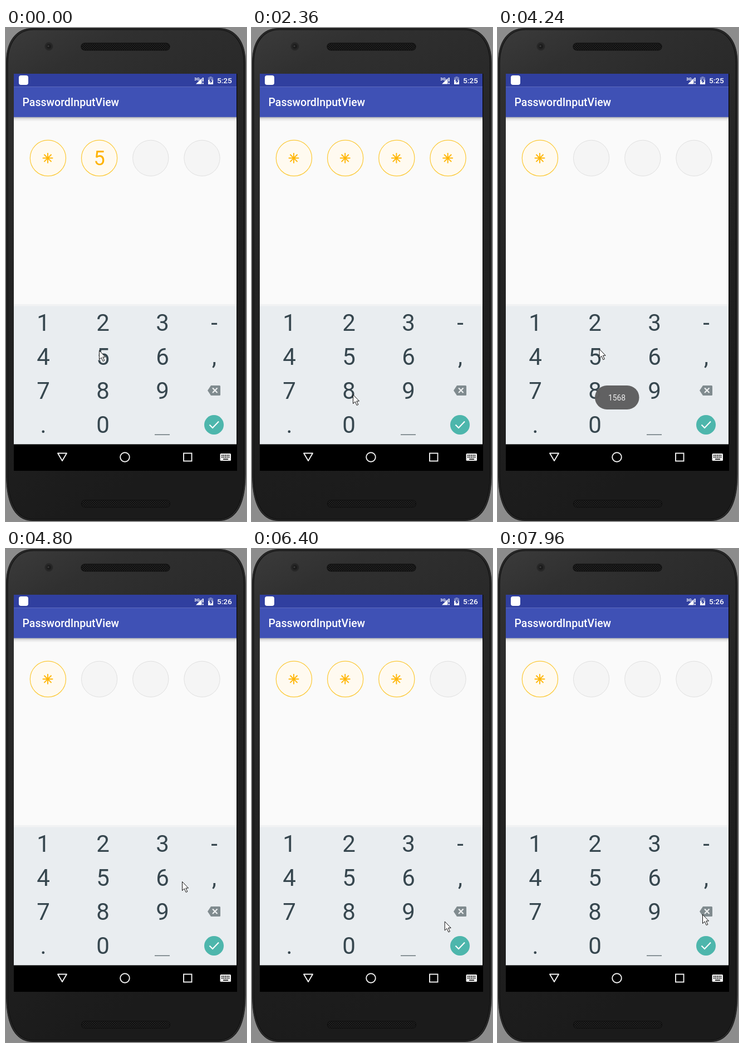
An HTML page that plays this animation: 431x884 px, repeating every 8 s.

```html
<!DOCTYPE html>
<html lang="en">
<head>
<meta charset="utf-8">
<title>PasswordInputView</title>
<style>
html, body { margin: 0; width: 100%; height: 100%; overflow: hidden; background: #8c8c8c; }
svg { display: block; width: 431px; height: 884px; font-family: Roboto, sans-serif; }
.keys { font-size: 42px; fill: #37474f; text-anchor: middle; }
.medium { font-weight: 500; fill: #fff; }
.slot circle { fill: #f5f5f5; stroke: #e0e0e0; }
.slot text { font-size: 36px; fill: #ffb300; text-anchor: middle; }
.slot path { stroke: #ffb70a; stroke-width: 1.9; }
.slot.on circle { fill: #fffaf0; stroke: #fcc936; stroke-width: 1.2; }
</style>
</head>
<body>
<svg viewBox="0 0 431 884">
  <defs>
    <linearGradient id="metal" x1="0" y1="0" x2=".25" y2="1">
      <stop offset="0" stop-color="#3b3b3b"/>
      <stop offset=".12" stop-color="#303030"/>
      <stop offset=".5" stop-color="#232323"/>
      <stop offset="1" stop-color="#1b1b1b"/>
    </linearGradient>
    <linearGradient id="shade" x1="0" y1="0" x2="0" y2="1">
      <stop offset="0" stop-color="#000" stop-opacity=".28"/>
      <stop offset=".4" stop-color="#000" stop-opacity=".09"/>
      <stop offset="1" stop-color="#000" stop-opacity="0"/>
    </linearGradient>
    <pattern id="mesh" width="4" height="4" patternUnits="userSpaceOnUse">
      <rect width="4" height="4" fill="#222"/>
      <circle cx="1" cy="1" r="1" fill="#060606"/>
      <circle cx="3" cy="3" r="1" fill="#060606"/>
    </pattern>
    <path id="shell" d="M.5 62C.5 24 18 .5 48 .5H382C412 .5 430 24 430 62V800C430 845 418 883.500 382 883.500H48C12 883.500 .5 845 .5 800Z"/>
  </defs>

  <g id="phone">
    <rect width="431" height="884" fill="#8c8c8c"/>
    <use href="#shell" fill="#292929" stroke="#171717"/>
    <use href="#shell" fill="url(#metal)" stroke="#111" stroke-width="1.2" transform="translate(2.500 2.500) scale(.988 .9943)"/>
    <g fill="url(#mesh)" stroke="#0f0f0f" stroke-width="1.2">
      <rect x="135" y="27" width="159" height="13" rx="6.500"/>
      <rect x="135.500" y="846.500" width="159" height="13" rx="6.500"/>
    </g>
    <circle cx="77" cy="33" r="7.500" fill="#262626" stroke="#303030"/>
    <circle cx="77" cy="33" r="4" fill="#1b1b1b"/>
    <circle cx="76" cy="32.500" r="1.600" fill="#3c3c3c"/>
  </g>

  <g id="screen">
    <rect x="14" y="82" width="401" height="712"/>
    <rect x="14" y="105" width="400" height="392" fill="#fafafa"/>
    <rect x="14" y="82" width="400" height="23.400" fill="#303f9f"/>
    <rect x="14" y="105.300" width="400" height="54.500" fill="#3f51b5"/>
    <rect x="14" y="159.800" width="400" height="8" fill="url(#shade)"/>
    <text class="medium" x="29.500" y="140" font-size="19.5">PasswordInputView</text>

    <g class="medium">
      <rect x="23" y="85" width="17" height="17" rx="4"/>
      <text x="338" y="93.500" font-size="8" font-weight="700">3G</text>
      <path d="M341 100.500L351.500 90V100.500Z"/>
      <path d="M352.700 89h2v7h-2zm0 9h2v2.500h-2z"/>
      <path d="M365.500 87h4v1.500h2.500V101h-9V88.500h2.500Z" opacity=".35"/>
      <path d="M363 93h9v8h-9Z"/>
      <path d="M368.500 90l-4 5.500h2.700v4l4-5.500h-2.700Z" fill="#303f9f"/>
      <text id="clock" x="379" y="99" font-size="13.6"></text>
    </g>
  </g>

  <g id="slots"></g>

  <g id="keyboard">
    <rect x="14" y="495" width="400" height="4" fill="#f1f2f3"/>
    <rect x="14" y="499" width="400" height="247.400" fill="#e9edf0"/>
    <rect id="press" x="337" y="627" width="73" height="46" rx="2" fill="#cdd5d9"/>
    <g id="keys" class="keys"></g>
    <rect x="267" y="728.500" width="27" height="1.500" fill="#6b777c"/>
    <path d="M362 650l6-9h15.500q1.500 0 1.500 1.500v15q0 1.500-1.500 1.500H368Z" fill="#808b8f"/>
    <path d="M371 645.500l8.500 8.500m0-8.500l-8.500 8.500" stroke="#eef1f2" stroke-width="2.200"/>
    <circle cx="373.500" cy="711.500" r="17.500" fill="#4db6ac"/>
    <path d="M365.500 711.500l5.500 5.500 11-11.500" fill="none" stroke="#fff" stroke-width="2.100"/>
  </g>

  <g id="nav" fill="none" stroke="#f2f2f2" stroke-width="1.900">
    <path d="M93 762.500h16l-8 13.500Z" stroke-linejoin="round"/>
    <circle cx="213.500" cy="769.500" r="8.300"/>
    <rect x="319" y="762.500" width="14.500" height="14"/>
    <rect x="384.500" y="763" width="19.500" height="13" rx="1.500" fill="#f2f2f2" stroke="none"/>
    <path d="M387 766.300h15M387 769.500h15" stroke="#000" stroke-dasharray="1.800 1.300"/>
    <path d="M390 773.200h9" stroke="#000" stroke-width="1.600"/>
  </g>

  <g id="toast">
    <rect x="174" y="641" width="79.500" height="43" rx="21.500" fill="#5d5d5d" fill-opacity=".97"/>
    <text x="213.500" y="668" font-size="13.800" fill="#efefef" text-anchor="middle">1568</text>
  </g>

  <path id="cursor" d="M.5 .5V16.500L4.200 13l3 6.500 2.600-1.200-3-6.300H11.500Z" fill="#fff" stroke="#111"/>
</svg>
<script>
const LOOP = 8000;
const MASK = 220;      // a digit turns into a star
const CLEAR = 380;     // a full code is wiped
const PRESS = 110;     // the delete key lights up before it acts
const MINUTE = 4480;
const DEL = "<";

const TAPS = [[-160, "5"], [830, "6"], [2120, "8"], [3940, "5"], [5050, "6"], [5860, "9"],
  [7100, DEL], [7880, DEL]];

// pointer trips: start, duration, x, y
const START = [167, 578];
const TRIPS = [[60, 210, 289, 590], [1000, 190, 270, 613], [1190, 590, 181, 657],
  [3150, 340, 167, 573], [4190, 520, 316, 596], [5050, 470, 281, 645],
  [6030, 240, 336, 672], [6270, 460, 370, 656], [7840, 120, 367, 655]];

const byId = id => document.getElementById(id);
const ramp = (t, start, span) => Math.min(1, Math.max(0, (t - start) / span));

// replay the taps up to t
function entryAt(t) {
  let code = ["*"];
  for (const [at, key] of TAPS) {
    if (at > t) break;
    if (key === DEL) code.pop();
    else code.push(t < at + MASK ? key : "*");
    if (code.length === 4 && t >= at + CLEAR) code = [];
  }
  return code;
}

function cursorAt(t) {
  return TRIPS.reduce((p, [start, span, ...to]) =>
    p.map((v, i) => v + (to[i] - v) * ramp(t, start, span)), START);
}

const toastAt = t => ramp(t, 2450, 550) - ramp(t, 4300, 500);
const pressedAt = t => TAPS.some(([at, key]) => key === DEL && t >= at - PRESS && t < at);

byId("keys").innerHTML = ["123-", "456,", "789", ".0"].map((row, r) =>
  [...row].map((c, i) =>
    `<text x="${Math.min(67 + 107 * i, 374)}" y="${543 + 61 * r}">${c}</text>`).join("")).join("");

const spokes = [0, 45, 90, 135].map(a => {
  const x = 9.3 * Math.cos(a * Math.PI / 180), y = 9.3 * Math.sin(a * Math.PI / 180);
  return `M${-x} ${-y}L${x} ${y}`;
}).join("");
byId("slots").innerHTML = [0, 1, 2, 3].map(i =>
  `<g class="slot" transform="translate(${75.4 + 92.2 * i} 233.300)"><circle r="32.100"/>
   <path d="${spokes}" transform="translate(-.400 0)"/><text y="12.700"></text></g>`).join("");
const slots = [...byId("slots").children];

function draw(t) {
  const code = entryAt(t);
  slots.forEach((slot, i) => {
    const c = code[i] || "";
    slot.classList.toggle("on", c !== "");
    slot.querySelector("path").style.display = c === "*" ? "" : "none";
    slot.querySelector("text").textContent = c === "*" ? "" : c;
  });
  byId("clock").textContent = t < MINUTE ? "5:25" : "5:26";
  byId("press").style.opacity = pressedAt(t) ? 1 : 0;
  byId("toast").style.opacity = toastAt(t);
  byId("cursor").setAttribute("transform", `translate(${cursorAt(t)})`);
}

const start = performance.now();
function tick() {
  draw((performance.now() - start) % LOOP);
  requestAnimationFrame(tick);
}
tick();
</script>
</body>
</html>
```
